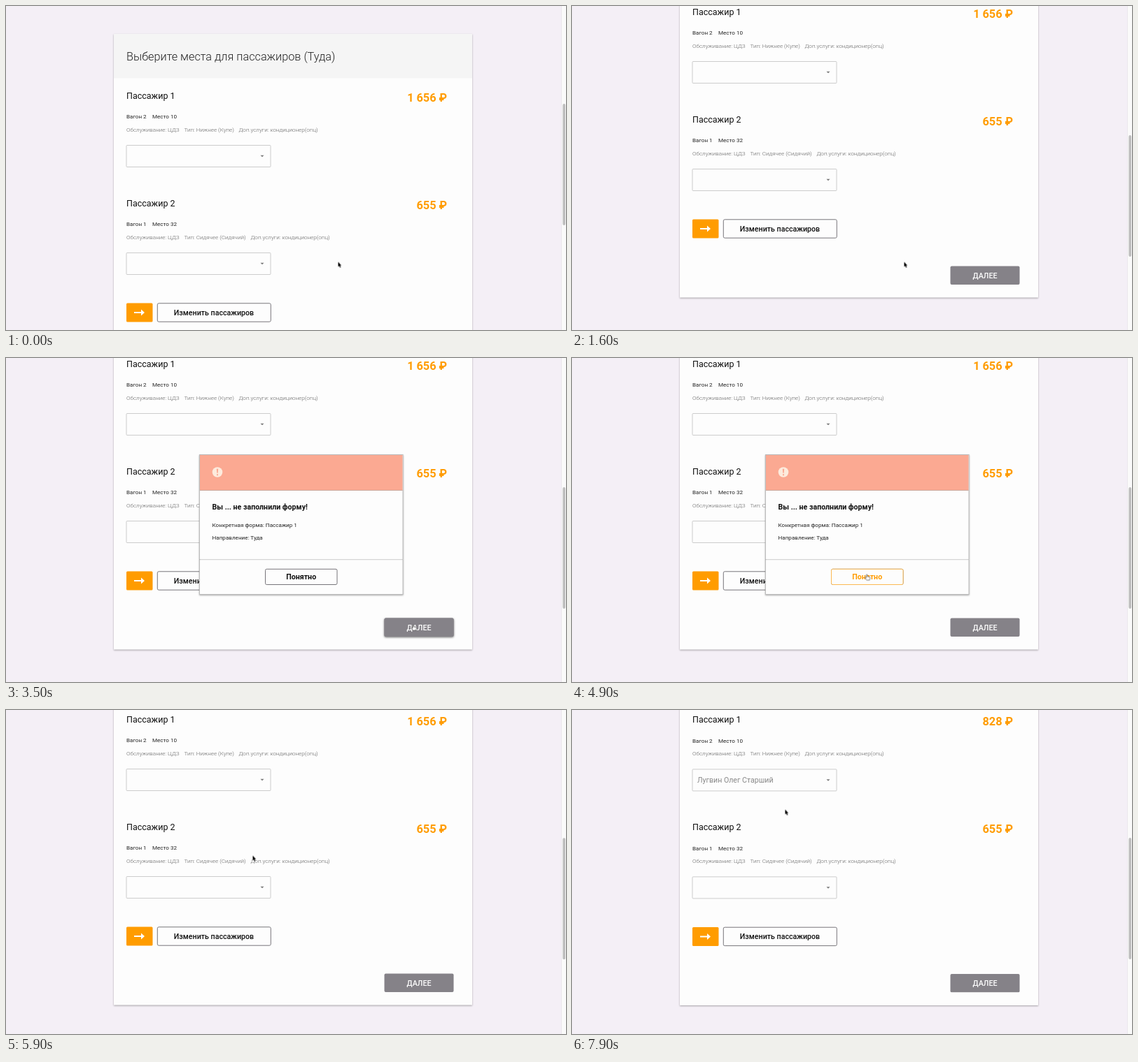
Recreate the animation shown at these times as an HTML page. Size 800x464 px, loop 8000 ms.

```html
<!DOCTYPE html>
<html lang="ru">
<head>
<meta charset="utf-8">
<title>Выбор мест</title>
<style>
  @property --scroll { syntax: "<length>"; inherits: true; initial-value: 0px; }

  html, body { margin: 0; width: 100%; height: 100%; overflow: hidden; background: #f4eff6; }
  svg { display: block; width: 100%; height: 100%; font-family: Roboto, sans-serif; }

  .stage, .anim { animation: 8s step-end infinite; }
  .stage { animation-name: scroll; }
  .page { transform: translateY(calc(-1 * var(--scroll))); }
  .thumb { transform: translateY(calc(.375 * var(--scroll))); }

  .title { font-size: 16.25px; font-weight: 300; fill: #222; }
  .name { font-size: 12.5px; fill: #111; }
  .price { font-size: 16.25px; font-weight: 700; fill: #ff9c00; text-anchor: end; }
  .seat { font-size: 8.1px; fill: #222; }
  .info { font-size: 8.1px; font-weight: 300; fill: #666; }
  .choice { font-size: 10.625px; fill: #888; }
  .button { font-size: 10.65px; font-weight: 500; text-anchor: middle; }
  .bold { font-size: 10.625px; font-weight: 700; fill: #111; }
  .field { fill: #fdfdfd; stroke: #ccc; }
  .outline { fill: #fdfdfd; stroke: #77757a; }
  .card { filter: drop-shadow(0 1px 1px #0005); }
  .raised { filter: drop-shadow(0 1px 1.5px #0009); }

  .pressed { animation-name: pressed; }
  .dialog { animation-name: dialog; }
  .hover { animation-name: hover; }
  .before { animation-name: before; }
  .after { animation-name: after; }
  .cursor { animation-name: move; }
  .arrow { animation-name: arrow; }
  .hand { animation-name: hand; }

  @keyframes scroll {
    0% { --scroll: 0px; }
    7.5% { --scroll: 1px; }
    10% { --scroll: 2px; }
    12.5% { --scroll: 3px; }
    13.75% { --scroll: 4px; }
    15% { --scroll: 20px; }
    16.25% { --scroll: 64px; }
    17.5% { --scroll: 104px; }
    18.75% { --scroll: 117px; }
    20% { --scroll: 120px; }
    67.5% { --scroll: 119px; }
    68.75% { --scroll: 118px; }
    70% { --scroll: 117px; }
    71.25% { --scroll: 116px; }
    72.5%, 94.9% { --scroll: 115px; }
    95%, 100% { --scroll: 114.6px; }
  }
  @keyframes move {
    0% { transform: translate(474.5px, 366.5px); }
    21.25% { transform: translate(474.5px, 366.5px); animation-timing-function: steps(7, start); }
    30% { transform: translate(578px, 384px); animation-timing-function: steps(4, start); }
    35% { transform: translate(581px, 381.5px); }
    46.25% { transform: translate(581px, 381.5px); animation-timing-function: steps(9, start); }
    57.5% { transform: translate(420.5px, 309.5px); }
    67.5% { transform: translate(420.5px, 309.5px); animation-timing-function: steps(6, start); }
    75% { transform: translate(352.5px, 208.5px); animation-timing-function: steps(3, start); }
    78.75% { transform: translate(310px, 104px); }
    83.75% { transform: translate(310px, 104px); animation-timing-function: steps(6, start); }
    91.25% { transform: translate(300px, 138px); }
    95% { transform: translate(300px, 138px); animation-timing-function: steps(4, start); }
    100% { transform: translate(304.5px, 142.5px); }
  }
  @keyframes arrow {
    0% { opacity: 1; }
    28.75% { opacity: 0; }
    47.5% { opacity: 1; }
    56.25% { opacity: 0; }
    65%, 100% { opacity: 1; }
  }
  @keyframes hand {
    0% { opacity: 0; }
    28.75% { opacity: 1; }
    47.5% { opacity: 0; }
    56.25% { opacity: 1; }
    65%, 100% { opacity: 0; }
  }
  @keyframes pressed {
    0% { opacity: 0; }
    37.5% { opacity: 1; }
    48.75%, 100% { opacity: 0; }
  }
  @keyframes dialog {
    0% { opacity: 0; }
    40% { opacity: .35; }
    41.25% { opacity: .75; }
    42.5% { opacity: 1; }
    63.75% { opacity: .4; }
    65%, 100% { opacity: 0; }
  }
  @keyframes hover {
    0% { opacity: 0; }
    56.25% { opacity: .4; }
    57.5% { opacity: .8; }
    58.75% { opacity: 1; }
    65%, 100% { opacity: 0; }
  }
  @keyframes before {
    0% { opacity: 1; }
    92.5%, 100% { opacity: 0; }
  }
  @keyframes after {
    0% { opacity: 0; }
    92.5%, 100% { opacity: 1; }
  }
</style>
</head>
<body>
<svg class="stage" viewBox="0 0 800 464">
  <rect width="800" height="464" fill="#f4eff6"/>

  <g class="page">
    <g class="card">
      <rect x="154" y="40" width="512" height="497.5" fill="#fdfdfd"/>
      <rect x="154" y="40" width="512" height="63.5" fill="#f5f5f5"/>
    </g>
    <text class="title" x="172" y="77.5">Выберите места для пассажиров (Туда)</text>

    <text class="name" x="172" y="133">Пассажир 1</text>
    <text class="price anim before" x="630" y="136.7">1 656 ₽</text>
    <text class="price anim after" x="630" y="136.7">828 ₽</text>
    <text class="seat" x="172" y="161.3">Вагон 2</text>
    <text class="seat" x="209" y="161.3">Место 10</text>
    <text class="info" x="172" y="179.8">Обслуживание: ЦДЗ</text>
    <text class="info" x="254.5" y="179.8">Тип: Нижнее (Купе)</text>
    <text class="info" x="332.5" y="179.8">Доп.услуги: кондиционер(опц)</text>
    <rect class="field" x="172" y="199.5" width="206" height="31" rx="1"/>
    <path d="M363.5 213.8h5l-2.5 2.5z" fill="#777"/>
    <text class="choice anim after" x="179" y="218.8">Лугвин Олег Старший</text>

    <g transform="translate(0 154)">
      <text class="name" x="172" y="133">Пассажир 2</text>
      <text class="price" x="630" y="136.7">655 ₽</text>
      <text class="seat" x="172" y="161.3">Вагон 1</text>
      <text class="seat" x="209" y="161.3">Место 32</text>
      <text class="info" x="172" y="179.8">Обслуживание: ЦДЗ</text>
      <text class="info" x="254.5" y="179.8">Тип: Сидячее (Сидячий)</text>
      <text class="info" x="349.5" y="179.8">Доп.услуги: кондиционер(опц)</text>
      <rect class="field" x="172" y="199.5" width="206" height="31" rx="1"/>
      <path d="M363.5 213.8h5l-2.5 2.5z" fill="#777"/>
    </g>

    <rect x="172" y="425.5" width="37.5" height="27" rx="1.5" fill="#ff9c00"/>
    <path d="M183 438h10v-3.5l5 4.5-5 4.5V440h-10z" fill="#fff"/>
    <rect class="outline" x="216.3" y="425.8" width="162" height="26.4" rx="2"/>
    <text class="button" x="297" y="442.8" fill="#111">Изменить пассажиров</text>

    <rect class="raised anim pressed" x="540.5" y="492.5" width="99" height="26.5" rx="2" fill="#858288"/>
    <rect x="540.5" y="492.5" width="99" height="26.5" rx="2" fill="#858288"/>
    <text class="button" x="590" y="509.7" fill="#fff">ДАЛЕЕ</text>
  </g>

  <g class="anim dialog">
    <g class="card">
      <rect x="276.5" y="138.5" width="290.5" height="200" fill="#fdfdfd" stroke="#bbb"/>
    </g>
    <rect x="277" y="139" width="289.5" height="50.5" fill="#fba992"/>
    <path d="M277 189.5h289.5" stroke="#c9a99f"/>
    <circle cx="302" cy="163.5" r="7.3" fill="#fdebdd"/>
    <path d="M300.8 158.8h2.4l-.5 6h-1.4zM301 166.2h2v2h-2z" fill="#fba992"/>
    <text class="bold" x="294.5" y="216.9">Вы ... не заполнили форму!</text>
    <text class="seat" x="294.5" y="241.8">Конкретная форма: Пассажир 1</text>
    <text class="seat" x="294.5" y="259.8">Направление: Туда</text>
    <path d="M277 288.7h290" stroke="#999" stroke-dasharray="1 1"/>
    <rect class="outline" x="370.5" y="302.3" width="102.5" height="22.2" rx="2"/>
    <text class="bold" x="421.7" y="317.2" text-anchor="middle">Понятно</text>
    <g class="anim hover">
      <rect x="370.5" y="302.3" width="102.5" height="22.2" rx="2" fill="#fdfdfd" stroke="#fbb952"/>
      <text class="bold" x="421.7" y="317.2" text-anchor="middle" style="fill:#ff9c00">Понятно</text>
    </g>
  </g>

  <rect x="793.5" width="6.5" height="464" fill="#fafafa"/>
  <path d="M793.5 0v464" stroke="#ebe8ec"/>
  <rect class="thumb" x="795.3" y="140" width="3.8" height="174" rx="1.9" fill="#bfbfbf"/>

  <g class="anim cursor">
    <path class="anim arrow" d="M0 0v7l1.5-1.4 1.2 2.7 1.2-.5-1.2-2.6h2z"
          fill="#000" stroke="#fff" stroke-width=".6" paint-order="stroke"/>
    <path class="anim hand" d="M0 .8q.7-1 1.4 0v2.6l3.4.8q.7.4.5 1.4l-.7 3H.4L-2 5.3q.1-1 1.1-.5L0 5.5z"
          fill="#fff" stroke="#333" stroke-width=".6"/>
  </g>
</svg>
</body>
</html>
```
